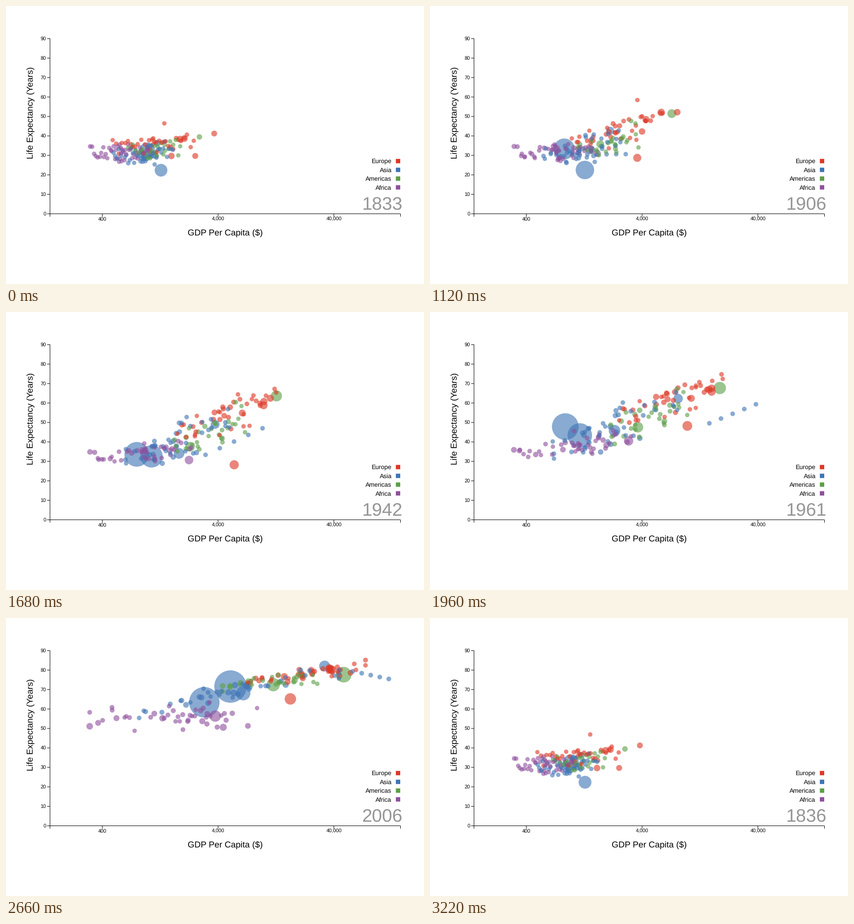
These frames come from a looping animation (879 by 584 pixels, 3.36 s). A matplotlib script:

```python
import numpy as np
import matplotlib.pyplot as plt
from matplotlib.animation import FuncAnimation
from matplotlib.colors import to_rgba

W, H, DPI = 879, 584, 64
PT = 72 / DPI                       # points per pixel
FRAMES, STEP = 24, 140
START, PACE, SPAN, LAST = 1833.65, 9.1, 206.5, 2010
FIRST = 1800
LEFT, RIGHT, TOP, BASE = 92.5, 829.5, 68.5, 436.5
COLORS = {"Europe": "#dd3826", "Asia": "#3e74b5",
          "Americas": "#5c9f48", "Africa": "#8e509d"}

plt.rcParams.update({"font.family": "Liberation Sans", "text.hinting": "none"})
rng = np.random.default_rng(5)
countries = []                      # pairs of (rgba, state function)


def progress(year):
    return np.clip((year - FIRST) / SPAN, 0, 1)


def smooth(t):
    return t * t * (3 - 2 * t)


def mix(a, b, t):
    return a + (b - a) * t


def add(group, state):
    countries.append((to_rgba(COLORS[group], 0.61), state))


def crowd(group, count, x, width, x_pow, y, y_pow, tilt, scatter):
    """Small countries: richer ones (rank > 0) start living longer sooner."""
    for s in np.linspace(-1, 1, count):
        rank = 2 * s * abs(s) ** 0.4
        late = np.clip(0.85 * rank + 0.5 * rng.normal(), -2, 2)
        luck, late_luck, delay = np.clip(rng.normal(size=3), -1.8, 1.8)
        pop = min(rng.exponential(0.8), 4)
        x0, x1 = x[0] + width[0] * rank, x[1] + width[1] * late
        y0 = y[0] - 2 * rank + scatter[0] * luck
        y1 = y[1] + tilt * late + scatter[1] * late_luck
        power = y_pow * np.exp(0.2 * delay - 0.2 * rank)

        def state(year, x0=x0, x1=x1, y0=y0, y1=y1, power=power, pop=pop):
            t = progress(year)
            return (mix(x0, x1, t ** x_pow), mix(y0, y1, smooth(t ** power)),
                    4.6 + pop * mix(0.1, 1, t * t))
        add(group, state)


def giant(group, radii, *points):
    """A bubble that passes through a few (year, x, y) points."""
    years, xs, ys = zip(*points)

    def state(year):
        return (np.interp(year, years, xs), np.interp(year, years, ys),
                mix(*radii, progress(year) ** 1.5))
    add(group, state)


crowd("Europe", 36, x=(299, 632), width=(42, 62), x_pow=1.9,
      y=(291, 119), y_pow=2.2, tilt=-9, scatter=(10, 7))
crowd("Asia", 42, x=(287, 490), width=(31, 105), x_pow=2.9,
      y=(311, 154), y_pow=3.2, tilt=-20, scatter=(13, 11))
crowd("Americas", 29, x=(304, 552), width=(27, 62), x_pow=1.9,
      y=(305, 134), y_pow=2.9, tilt=-4, scatter=(11, 8))
crowd("Africa", 45, x=(239, 352), width=(31, 88), x_pow=2.3,
      y=(309, 205), y_pow=4.4, tilt=-5, scatter=(10, 17))

giant("Asia", (15, 34), (1833, 297, 303), (1943, 275, 299), (1979, 294, 183), (2006, 472, 144))
giant("Asia", (12, 32), (1906, 326, 345), (1943, 306, 303), (1979, 324, 216), (2006, 417, 177))
giant("Asia", (6.5, 11.5), (1870, 318, 288), (1943, 440, 236), (1979, 603, 128), (2006, 670, 101))
giant("Asia", (6, 15), (1833, 285, 312), (1943, 364, 297), (1979, 412, 202), (2006, 499, 158))
giant("Americas", (5, 16.5), (1833, 406, 275), (1870, 448, 276), (1943, 569, 176), (2006, 710, 119))
giant("Americas", (4.8, 14), (1833, 300, 305), (1943, 387, 283), (2006, 562, 140))
giant("Europe", (6.5, 12), (1833, 347, 315), (1943, 480, 321), (1979, 602, 158), (2006, 598, 170))
giant("Europe", (6, 8.5), (1833, 437, 268), (1870, 484, 265), (1943, 556, 181), (2006, 683, 108))
giant("Europe", (7, 9.3), (1833, 374, 279), (1943, 542, 196), (1979, 642, 139), (2006, 685, 109))
giant("Europe", (7, 8), (1833, 365, 280), (1906, 453, 239), (1979, 630, 138), (2006, 680, 107))
giant("Europe", (6.2, 8), (1833, 398, 315), (1870, 395, 315), (1943, 497, 212), (2006, 680, 105))
giant("Europe", (4.7, 4.8), (1833, 332, 247), (1943, 488, 173), (2006, 736, 109))
giant("Africa", (5, 12), (1833, 285, 307), (1943, 385, 311), (1979, 450, 231), (2006, 440, 206))

# Oil states jump to the right edge, then fall back
for k in range(5):
    giant("Asia", (4.7, 5), (1833, 296 + 5 * k, 316), (1906, 330 + 20 * k, 312),
          (1943, 420 + 30 * k, 300 - 14 * k), (1979, 754 + 19 * k, 168 - 6 * k),
          (2006, 729 + 19 * k, 112 + 4 * k))

colors = np.array([c for c, _ in countries])

fig = plt.figure(figsize=(W / DPI, H / DPI), dpi=DPI, facecolor="white")
ax = fig.add_axes([0, 0, 1, 1])
ax.set(xlim=(0, W), ylim=(H, 0))
ax.axis("off")


def line(x, y):
    ax.plot(x, y, color="black", lw=PT, solid_capstyle="butt", snap=False, zorder=1)


def label(x, y, text, size, ha="center", **kw):
    return ax.text(x, y, text, fontsize=size * PT, ha=ha, va="baseline", zorder=1, **kw)


line([LEFT, LEFT], [TOP - 0.5, BASE + 0.5])
line([LEFT, RIGHT], [BASE, BASE])
for age in range(0, 100, 10):
    y = mix(BASE, TOP, age / 90)
    line([LEFT - 6, LEFT], [y, y])
    label(84.3, y + 3.3, str(age), 10.6, "right")
for k, money in enumerate((400, 4000, 40000)):
    label(202.5 + 243.5 * k, 451, f"{money:,}", 10.6)
for x in (LEFT, 202.5, 446, 689.5, RIGHT):
    line([x, x], [BASE, BASE + 6])
label(461, 482.3, "GDP Per Capita ($)", 18.2)
label(56.5, 224.5, "Life Expectancy (Years)", 18.4, rotation=90, rotation_mode="anchor")
for k, (name, color) in enumerate(COLORS.items()):
    y = 325.8 + 18.4 * k
    label(811, y + 4.5, name, 13.1, "right")
    ax.add_patch(plt.Rectangle((819.8, y - 4.6), 9.2, 9.2, fc=color, lw=0, snap=False))

counter = label(833.5, 428, "", 38.4, "right", color="#969696")
dots = ax.scatter([], [], linewidths=0, zorder=3)


def draw(i):
    year = START + PACE * i
    if year > LAST:
        year -= SPAN
    x, y, r = np.array([state(year) for _, state in countries]).T
    order = np.argsort(-r, kind="stable")       # small bubbles on top
    dots.set_offsets(np.column_stack([x, y])[order])
    dots.set_sizes((2 * r[order] * PT) ** 2)
    dots.set_facecolors(colors[order])
    counter.set_text(str(int(year)))
    return dots, counter


anim = FuncAnimation(fig, draw, frames=FRAMES, interval=STEP,
                     init_func=lambda: draw(0), repeat=True, repeat_delay=0)
plt.show()
```
